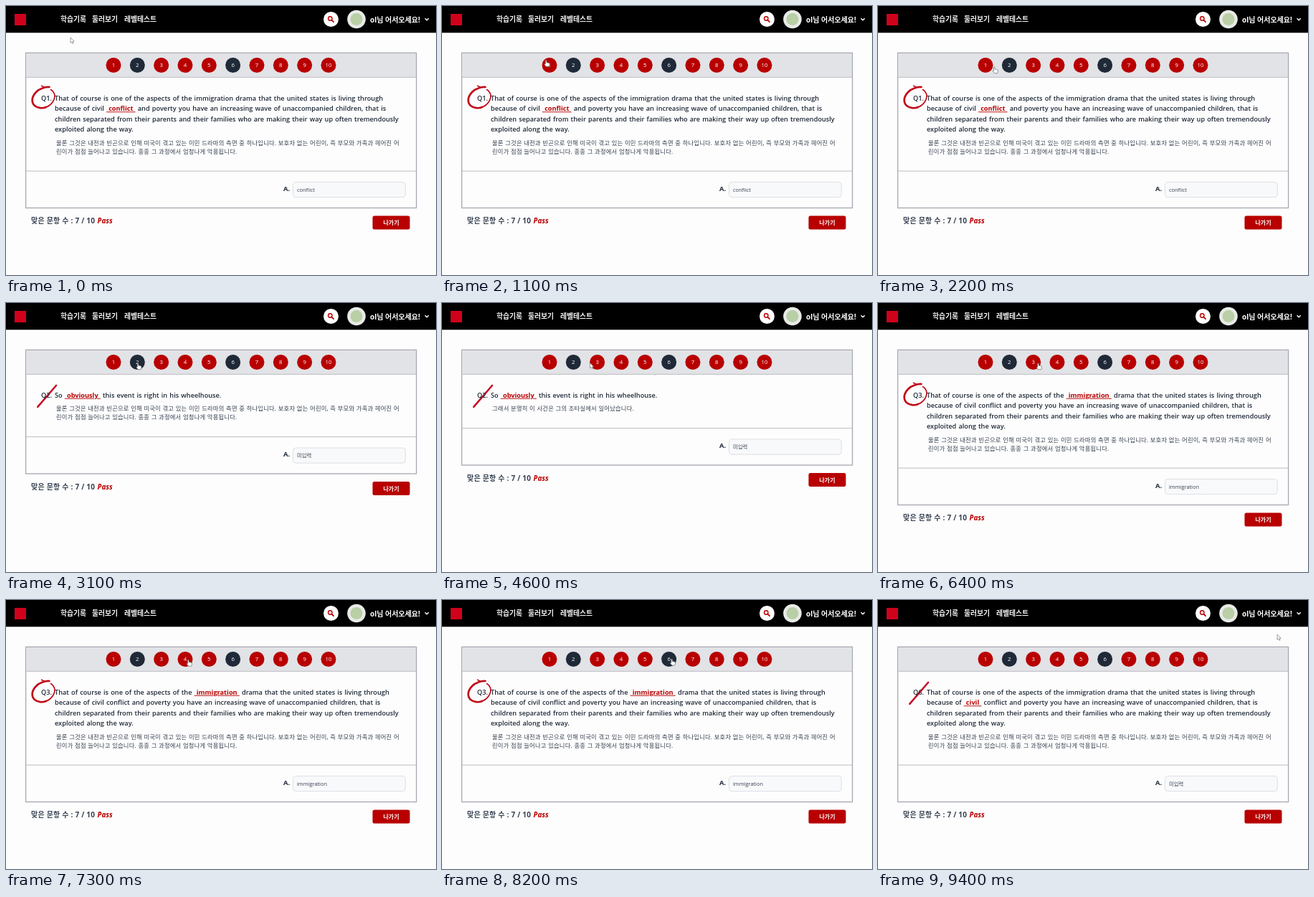
Animation of 600x375 px, one loop 9500 ms. Source, as an HTML page:

```html
<!DOCTYPE html>
<html lang="ko">
<head>
<meta charset="utf-8">
<style>
html, body { margin: 0; width: 100%; height: 100%; overflow: hidden; background: #fdfdfd; }
svg { display: block; width: 600px; height: 375px; font-family: "Open Sans", "Noto Sans CJK KR", "Noto Sans CJK JP", sans-serif; }
text { white-space: pre; }
.nav { font-size: 9.8px; font-weight: 700; fill: #f4f4f4; }
.hello { font-size: 10px; font-weight: 700; fill: #fff; }
.num { font-size: 7.8px; fill: #fff; text-anchor: middle; }
.quiz { font-size: 9.2px; font-weight: 600; fill: #1f2937; word-spacing: .75px; }
.blank { font-weight: 700; fill: #b80000; text-decoration: underline; }
.ko { font-size: 8.3px; fill: #374151; letter-spacing: .2px; word-spacing: .2px; }
.label { font-size: 9.5px; font-weight: 700; fill: #1f2937; }
.answer { font-size: 7.4px; fill: #374151; }
.score { font-size: 10px; font-weight: 700; fill: #374151; letter-spacing: .22px; }
.pass { font-size: 10px; font-weight: 700; font-style: italic; fill: #b80000; }
.leave { font-size: 8px; font-weight: 700; fill: #fff; text-anchor: middle; }
</style>
</head>
<body>
<svg viewBox="0 0 600 375">
  <rect width="600" height="375" fill="#fdfdfd"/>
  <rect width="600" height="37.3"/>
  <rect x="12" y="11" width="16" height="16" fill="#d0021b"/>
  <g class="nav">
    <text x="76" y="21.7">학습기록</text>
    <text x="120" y="21.7">둘러보기</text>
    <text x="165" y="21.7">레벨테스트</text>
  </g>
  <circle cx="453.5" cy="18.5" r="10.5" fill="#fff"/>
  <path d="M454.4 19.6L457 22.2" stroke="#b80000" stroke-width="1.8" stroke-linecap="round"/>
  <circle cx="452.3" cy="17.5" r="2.7" fill="none" stroke="#b80000" stroke-width="1.4"/>
  <circle cx="489" cy="18.5" r="12.8" fill="#e8eae8"/>
  <circle cx="489" cy="18.5" r="8.5" fill="#b9cfa5"/>
  <text class="hello" x="508" y="22.5">ol님 어서오세요!</text>
  <path d="M584.6 17.2l2.6 2.6l2.6-2.6" fill="none" stroke="#fff" stroke-width="1.4"/>

  <rect id="table" x="27.6" y="65.4" width="545" fill="#fdfdfd" stroke="#a5a8b0" stroke-width="1.3"/>
  <rect x="28.2" y="66" width="543.8" height="33" fill="#e2e3e7"/>
  <path d="M28 99.4H572" stroke="#bcbdc2"/>
  <g id="dots"></g>

  <g id="ring" fill="none" stroke="#c00a18" stroke-linecap="round" stroke-linejoin="round">
    <path d="M60.5 113C55 112.6 47 115 42.5 119.5C36 126 34.5 134 40 139C44.5 142.6 51 143 56 141" stroke-width="2.7"/>
    <path d="M56 141C64 138 70 129 67.3 122C66.4 119.6 65 118 62.5 116.6" stroke-width="1.7"/>
    <path d="M49.5 111.3L54 113.4" stroke-width="1.5"/>
  </g>
  <path id="slash" d="M44.2 144.8L70 115" stroke="#c8102a" stroke-width="2.6" stroke-linecap="round"/>
  <text id="no" class="quiz" x="49" y="131.8"></text>
  <g id="quiz" class="quiz"></g>
  <g id="ko" class="ko"></g>

  <g id="foot">
    <path d="M28 0H572" stroke="#bcbdc2"/>
    <text class="label" x="387" y="27.8">A.</text>
    <rect x="400.5" y="15.3" width="156.8" height="21.2" rx="4" fill="#f8f9fb" stroke="#d6d9df" stroke-width=".8"/>
    <text id="answer" class="answer" x="406" y="28.9"></text>
    <text class="score" x="35" y="73">맞은 문항 수 : 7 / 10</text>
    <text class="pass" x="127.6" y="73">Pass</text>
    <rect x="511.5" y="62.5" width="52" height="19" rx="2.5" fill="#b80000"/>
    <text class="leave" x="537.5" y="75">나가기</text>
  </g>

  <path id="arrow" d="M0 0V7.4L1.8 5.9L3 8.4L4.2 7.8L3.1 5.3H5.2Z" fill="#fff" stroke="#777" stroke-width=".7"/>
  <path id="hand" d="M-.8 .5Q0-.5 .8 .5V3.2Q1.7 2.7 2.3 3.5Q3.2 3.1 3.8 3.9Q4.9 3.7 4.9 4.9V6.7L4.1 8.8H.2L-2.1 5.9Q-2.3 4.7-.8 5.3Z"
    fill="#fff" stroke="#666" stroke-width=".7"/>
</svg>
<script>
const LOOP = 9500, STEP = 100;
const $ = id => document.getElementById(id);

// Blanked words are wrapped in square brackets.
const drama = [
  "That of course is one of the aspects of the immigration drama that the united states is living through",
  "because of civil conflict and poverty you have an increasing wave of unaccompanied children, that is",
  "children separated from their parents and their families who are making their way up often tremendously",
  "exploited along the way."
];
const withBlank = word => drama.map(line => line.replace(word, `[${word}]`));
const longKo = [
  "물론 그것은 내전과 빈곤으로 인해 미국이 겪고 있는 이민 드라마의 측면 중 하나입니다. 보호자 없는 어린이, 즉 부모와 가족과 헤어진 어",
  "린이가 점점 늘어나고 있습니다. 종종 그 과정에서 엄청나게 악용됩니다."
];
const shortKo = ["그래서 분명히 이 사건은 그의 조타실에서 일어났습니다."];

const q1 = { no: 1, lines: withBlank("conflict"), answer: "conflict", right: true };
const q2 = { no: 2, lines: ["So [obviously] this event is right in his wheelhouse."], answer: "미입력", right: false };
const q3 = { no: 3, lines: withBlank("immigration"), answer: "immigration", right: true };
const q6 = { no: 6, lines: withBlank("civil"), answer: "미입력", right: false };

// The translation arrives a little after each question.
const states = [
  { at: 0, q: q1, ko: longKo },
  { at: 3100, q: q2, ko: longKo },
  { at: 3300, q: q2, ko: shortKo },
  { at: 5600, q: q3, ko: shortKo },
  { at: 5700, q: q3, ko: longKo },
  { at: 8400, q: q6, ko: longKo }
];

// time, x, y of the pointer tip
const path = [
  [0, 90, 44], [400, 91, 45], [1400, 160, 84], [2200, 162.3, 85], [2600, 163, 85],
  [3000, 184, 84], [4100, 185, 84], [4600, 206.5, 83.5], [5100, 223, 84], [6400, 223.5, 84],
  [7000, 224, 84], [7800, 320, 82.3], [8500, 321, 82.3], [9300, 557, 48], [9500, 557, 48]
];
const dots = [...Array(10).keys()].map(i => 150 + i * 33.33);
const overDot = (x, y) => Math.abs(y - 82.5) < 10.5 && dots.some(d => x > d - 10 && x < d + 14);

$("dots").innerHTML = dots.map((x, i) => {
  const wrong = i === 1 || i === 5;
  return `<circle cx="${x}" cy="82.5" r="10.5" fill="${wrong ? "#1f2937" : "#b80000"}"/>` +
    `<text class="num" x="${x}" y="85.3">${i + 1}</text>`;
}).join("");

const rows = (lines, x, y, gap) => lines.map((s, i) =>
  `<text x="${x}" y="${y + i * gap}">${
    s.replace(/\[(\w+)\]/, '<tspan class="blank">\u00a0$1\u00a0</tspan>')}</text>`).join("");

let shown;
function show(s) {
  if (s === shown) return;
  shown = s;
  const { q, ko } = s;
  const koY = 135.8 + q.lines.length * 14.5;
  const foot = koY + 12.3 + ko.length * 12;
  $("no").textContent = `Q${q.no}.`;
  $("quiz").innerHTML = rows(q.lines, 68, 131.8, 14.5);
  $("ko").innerHTML = rows(ko, 70, koY, 12);
  $("answer").textContent = q.answer;
  $("ring").style.display = q.right ? "" : "none";
  $("slash").style.display = q.right ? "none" : "";
  $("foot").setAttribute("transform", `translate(0 ${foot})`);
  $("table").setAttribute("height", foot - 14);
}

function pointer(t) {
  const i = path.findIndex(p => p[0] > t);
  const [t0, x0, y0] = path[i - 1], [t1, x1, y1] = path[i];
  const k = (t - t0) / (t1 - t0), e = k * k * (3 - 2 * k);
  const x = x0 + (x1 - x0) * e, y = y0 + (y1 - y0) * e;
  const hand = overDot(x, y);
  for (const [id, on] of [["hand", hand], ["arrow", !hand]]) {
    $(id).style.display = on ? "" : "none";
    $(id).setAttribute("transform", `translate(${x} ${y})`);
  }
}

function draw(now) {
  const t = Math.floor(now % LOOP / STEP) * STEP;
  show(states.filter(s => s.at <= t).pop());
  pointer(t);
}

const start = performance.now();
function tick() {
  draw(performance.now() - start);
  requestAnimationFrame(tick);
}
tick();
</script>
</body>
</html>
```
